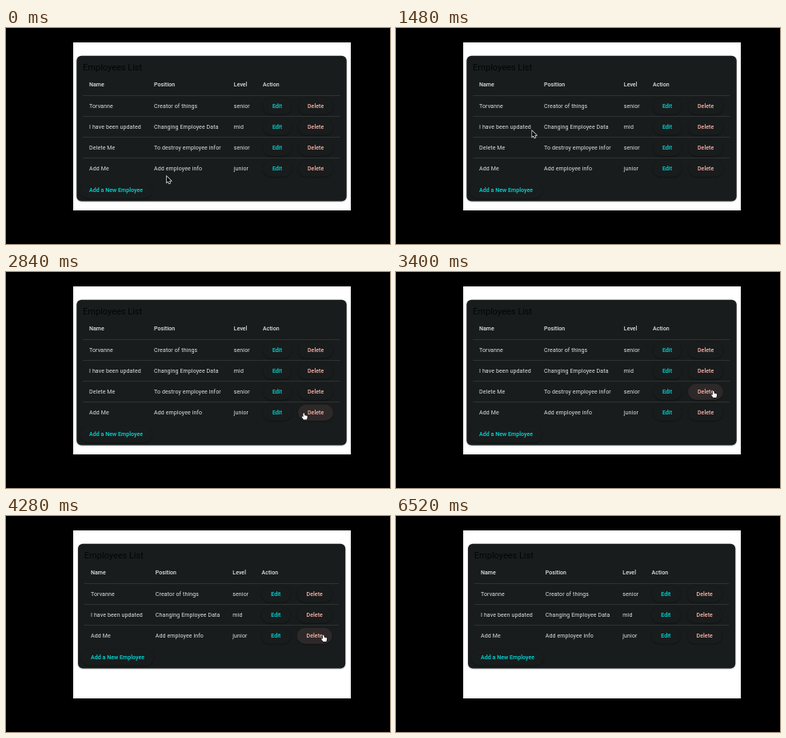
Recreate the animation shown at these times as an HTML page with a canvas. Size 480x270 px, loop 7000 ms.

```html
<!DOCTYPE html>
<html lang="en">
<head>
<meta charset="utf-8">
<title>Employees List</title>
<style>
html, body { margin: 0; width: 100%; height: 100%; overflow: hidden; background: #000; }
canvas { display: block; width: 480px; height: 270px; }
</style>
</head>
<body>
<canvas id="stage" width="480" height="270"></canvas>
<script>
const ctx = document.getElementById('stage').getContext('2d');
const LOOP = 7000, STEP = 40;
const PRESS = 4040, REMOVED = 4200, CURSOR_GONE = 5720;
const ROW = 26, FIRST_ROW = 84, BUTTON_H = 20;
const SURFACE = '#191c1c', INK = '#e0e3e3', CYAN = '#00dddd', CORAL = '#ffb4ab';

const people = [
  ['Torvanne', 'Creator of things', 'senior'],
  ['I have been updated', 'Changing Employee Data', 'mid'],
  ['Delete Me', 'To destroy employee infor', 'senior'],
  ['Add Me', 'Add employee info', 'junior']
];

// Column positions before and after the table shrinks
const wide = { left: 88.3, right: 425.7, cols: [104, 185, 284.8, 321], edit: 320.9, del: 365 };
const narrow = { left: 90, right: 424.2, cols: [106, 186.8, 283.3, 319.5], edit: 319.3, del: 363.6 };

// Cursor moves: start, end, from, to
const moves = [
  [440, 1120, [201, 185.5], [170.2, 128.5]],
  [1680, 2400, [170.2, 128.5], [372, 176.5]],
  [2800, 3400, [372, 176.5], [396.7, 148.7]],
  [4800, 5160, [396.7, 148.7], [207.5, 163.7]],
  [5480, 5680, [207.5, 163.7], [381, 23.5]]
];

const ease = p => p * p * (3 - 2 * p);

function cursorAt(t) {
  let pos = moves[0][2];
  for (const [start, end, from, to] of moves) {
    if (t < start) break;
    const p = ease(Math.min(1, (t - start) / (end - start)));
    pos = from.map((v, i) => v + (to[i] - v) * p);
  }
  return pos;
}

function text(str, x, y, color, weight = 400, size = 7, spacing = 0.125) {
  ctx.font = `${weight} ${size}px Roboto, sans-serif`;
  ctx.letterSpacing = spacing + 'px';
  ctx.fillStyle = color;
  ctx.fillText(str, x, y);
}

function pill(x, y, w, h, r) {
  ctx.beginPath();
  ctx.roundRect(x, y, w, h, r);
}

function shadowed(color, alpha, blur, dy) {
  ctx.save();
  ctx.shadowColor = `rgba(0,0,0,${alpha})`;
  ctx.shadowBlur = blur;
  ctx.shadowOffsetY = dy;
  ctx.fillStyle = color;
  ctx.fill();
  ctx.restore();
}

function ripple(b, cursor, p) {
  ctx.save();
  ctx.clip();
  ctx.globalAlpha = 0.12;
  ctx.fillStyle = b.color;
  ctx.beginPath();
  ctx.arc(cursor[0], cursor[1], 4 + 36 * p, 0, 7);
  ctx.fill();
  ctx.restore();
}

function button(b, hot, cursor, press) {
  pill(b.x, b.y, b.w, BUTTON_H, BUTTON_H / 2);
  shadowed(SURFACE, 0.4, 1.5, 0.7);
  if (hot) {
    ctx.globalAlpha = 0.09;
    ctx.fillStyle = b.color;
    ctx.fill();
    ctx.globalAlpha = 1;
    if (press !== null) ripple(b, cursor, press);
  }
  text(b.label, b.x + 12, b.y + 12.3, b.color, 500, 7, 0.05);
}

function isOver(b, [x, y]) {
  return x >= b.x && x <= b.x + b.w && y >= b.y && y <= b.y + BUTTON_H;
}

function drawArrow() {
  ctx.beginPath();
  [[0, 0], [0, 7.6], [1.7, 6.1], [2.9, 8.8], [4.2, 8.2], [3.1, 5.6], [5.4, 5.5]]
    .forEach(([x, y]) => ctx.lineTo(x, y));
  ctx.closePath();
  ctx.lineWidth = 1.3;
  ctx.strokeStyle = '#fff';
  ctx.stroke();
  ctx.fillStyle = '#000';
  ctx.fill();
}

function drawHand() {
  ctx.beginPath();
  ctx.moveTo(-0.8, 0.6);
  ctx.quadraticCurveTo(0, -0.6, 0.8, 0.6);
  ctx.lineTo(1, 3);
  ctx.quadraticCurveTo(4.6, 2.8, 4.5, 4.6);
  ctx.quadraticCurveTo(4.5, 6.4, 3.6, 8.3);
  ctx.lineTo(-0.3, 8.3);
  ctx.lineTo(-2.6, 5);
  ctx.quadraticCurveTo(-2.2, 3.8, -0.8, 5);
  ctx.closePath();
  ctx.lineWidth = 1;
  ctx.strokeStyle = '#000';
  ctx.stroke();
  ctx.fillStyle = '#fff';
  ctx.fill();
}

function drawCard(box, count) {
  pill(box.left, 34.8, box.right - box.left, 77.7 + ROW * count, 6);
  shadowed(SURFACE, 0.4, 2, 0.6);
  text('Employees List', box.left + 7.8, 53, '#040606', 400, 11, 0);
  ['Name', 'Position', 'Level', 'Action']
    .forEach((s, i) => text(s, box.cols[i], 73, INK, 500, 7, 0.05));
}

function draw(t) {
  const removed = t >= REMOVED;
  const box = removed ? narrow : wide;
  const rows = removed ? people.filter((_, i) => i !== 2) : people;
  const cursor = cursorAt(t);
  const press = t >= PRESS && t < REMOVED ? Math.min(1, (t - PRESS + STEP) / 225) : null;

  ctx.fillStyle = '#000';
  ctx.fillRect(0, 0, 480, 270);
  ctx.fillStyle = '#fff';
  ctx.fillRect(84, 18, 347, 210);
  drawCard(box, rows.length);

  const buttons = [];
  rows.forEach((row, i) => {
    const top = FIRST_ROW + ROW * i;
    ctx.fillStyle = '#2e3232';
    ctx.fillRect(box.left + 7.8, top, box.right - box.left - 16, 1);
    row.forEach((s, c) => text(s, box.cols[c], top + 16, INK));
    buttons.push(
      { label: 'Edit', x: box.edit, y: top + 3.7, w: 36.3, color: CYAN },
      { label: 'Delete', x: box.del, y: top + 3.7, w: 44, color: CORAL }
    );
  });
  buttons.push({
    label: 'Add a New Employee', x: box.cols[0] - 12,
    y: FIRST_ROW + ROW * rows.length + 4.7, w: 91, color: CYAN
  });

  const visible = t < CURSOR_GONE;
  const hot = visible && buttons.find(b => isOver(b, cursor));
  buttons.forEach(b => button(b, b === hot, cursor, press));

  if (visible) {
    ctx.save();
    ctx.translate(cursor[0], cursor[1]);
    hot ? drawHand() : drawArrow();
    ctx.restore();
  }
}

function tick() {
  const t = performance.now() % LOOP;
  draw(Math.floor(t / STEP) * STEP);
  requestAnimationFrame(tick);
}
tick();
</script>
</body>
</html>
```
